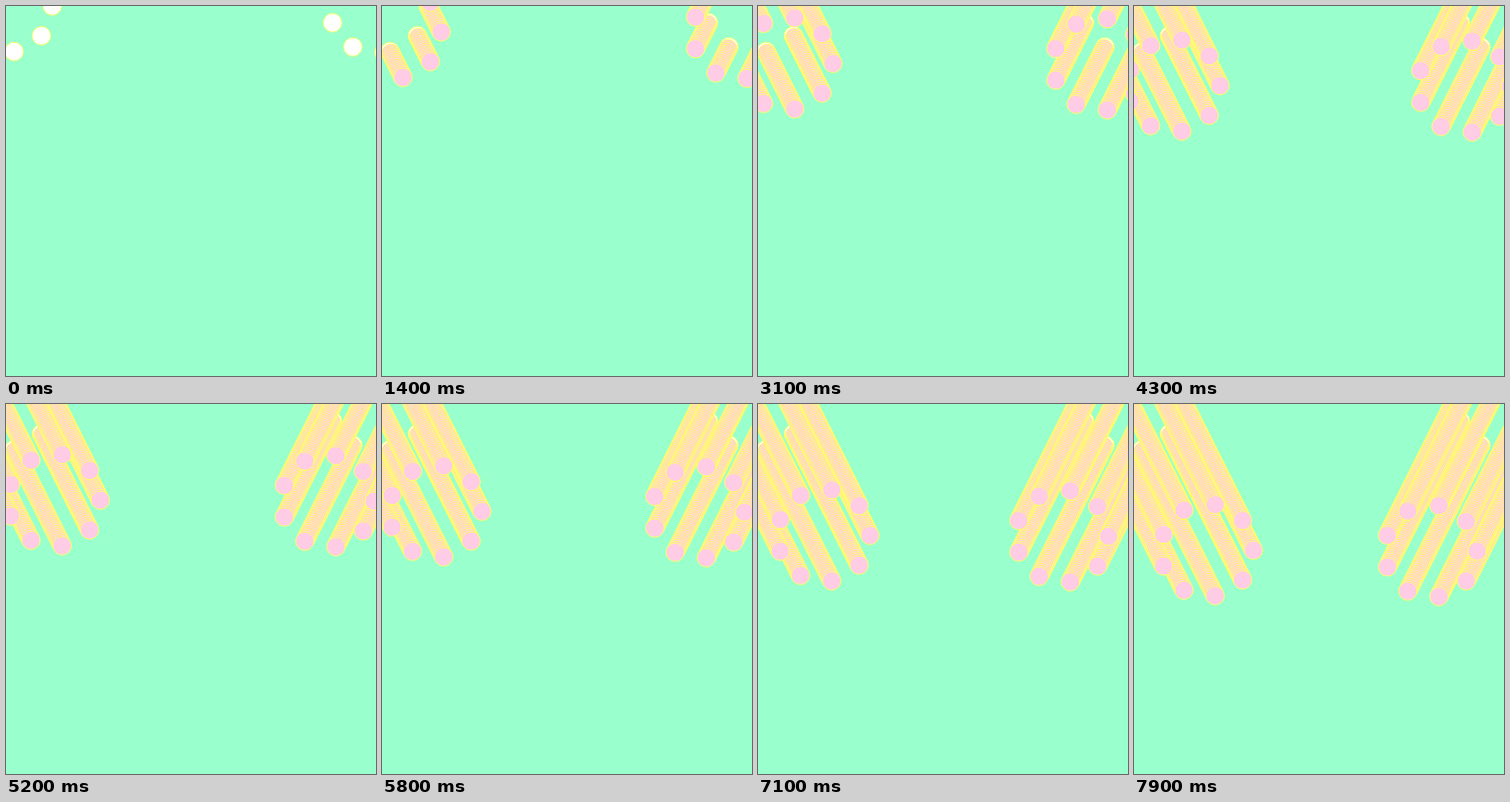
Write an HTML page with a canvas that moves like this. It is 400 px wide and 400 px high and loops after 8000 ms.

```html
<!DOCTYPE html>
<html lang="en">
<head>
<meta charset="utf-8">
<title>Falling rings</title>
<style>
  html, body { margin: 0; width: 100%; height: 100%; overflow: hidden; background: #99ffcc; }
  canvas { display: block; width: 400px; height: 400px; }
</style>
</head>
<body>
<canvas id="stage" width="400" height="400"></canvas>
<script>
  const ctx = document.getElementById('stage').getContext('2d');
  const STEP = 100, STEPS = 80;
  const DOTS = 9, RING = 50, RADIUS = 10;
  const TURN = Math.PI * 2;

  function dot(x, y) {
    ctx.beginPath();
    ctx.arc(x, y, RADIUS, 0, TURN);
    ctx.fill();
    ctx.stroke();
  }

  function ring(cx, cy) {
    for (let i = 0; i < DOTS; i++) {
      const a = TURN * i / DOTS;
      dot(cx + RING * Math.cos(a), cy + RING * Math.sin(a));
    }
  }

  // Earlier rings stay on the stage, so the dots leave ribbed trails.
  function draw(last) {
    ctx.fillStyle = '#99ffcc';
    ctx.fillRect(0, 0, 400, 400);
    ctx.strokeStyle = '#ffff66';
    ctx.lineWidth = 1;
    for (let n = 0; n <= last; n++) {
      ctx.fillStyle = n ? '#ffcce5' : '#ffffff';
      ring(n, 2 * n);
      ring(400 - n, 2 * n + 1);
    }
  }

  const start = performance.now();
  let shown = 0;
  draw(0);

  function tick() {
    const n = Math.floor((performance.now() - start) / STEP) % STEPS;
    if (n !== shown) {
      draw(n);
      shown = n;
    }
    requestAnimationFrame(tick);
  }
  requestAnimationFrame(tick);
</script>
</body>
</html>
```
